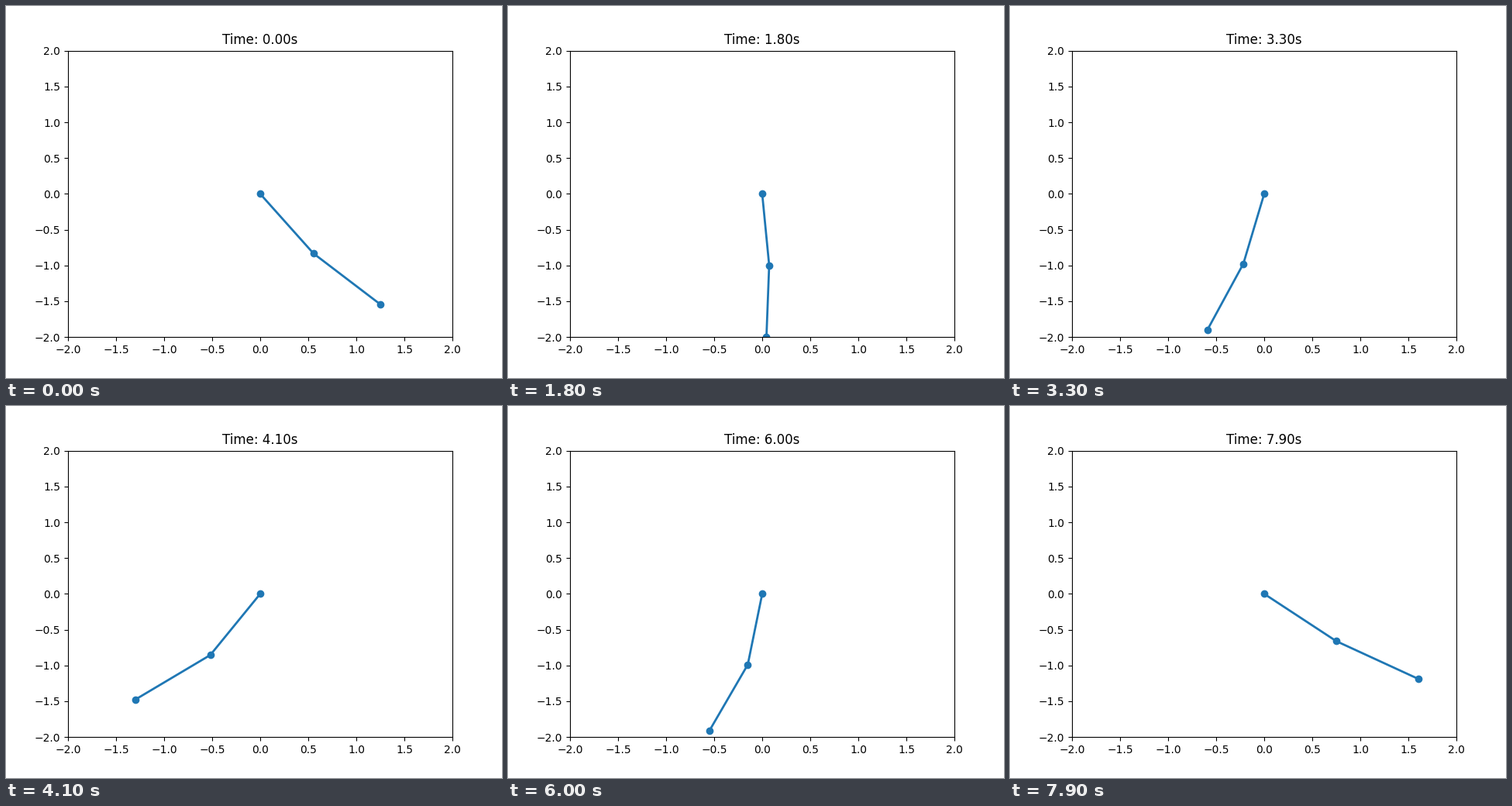
A matplotlib script that plays this animation: 640x480 px, repeating every 8000 ms.

```python
import numpy as np
import matplotlib.pyplot as plt
from matplotlib.animation import FuncAnimation

G = 9.81
DT = 0.1
FRAMES = 80
WARMUP = 2  # steps already taken when the clock reads zero


def accelerations(theta, omega):
    """Angular accelerations for unit masses and unit rods."""
    (t1, t2), (w1, w2) = theta, omega
    s, c = np.sin(t1 - t2), np.cos(t1 - t2)
    r1 = -s * w2**2 - 2 * G * np.sin(t1)
    r2 = s * w1**2 - G * np.sin(t2)
    return np.array([r1 - c * r2, 2 * r2 - c * r1]) / (2 - c**2)


def simulate(steps):
    """Semi-implicit Euler from rest; returns the angles after each step."""
    theta = np.array([np.pi / 4, np.pi / 4])
    omega = np.zeros(2)
    path = []
    for _ in range(steps):
        omega = omega + accelerations(theta, omega) * DT
        theta = theta + omega * DT
        path.append(theta)
    return np.array(path)


angles = simulate(FRAMES + WARMUP)[WARMUP - 1:]

fig, ax = plt.subplots(figsize=(6.4, 4.8), dpi=100)
ax.set_xlim(-2, 2)
ax.set_ylim(-2, 2)
rods, = ax.plot([], [], "o-", lw=2)
title = ax.set_title("")


def update(i):
    x = np.cumsum(np.sin(angles[i]))
    y = -np.cumsum(np.cos(angles[i]))
    rods.set_data([0, *x], [0, *y])
    title.set_text(f"Time: {i * DT:.2f}s")
    return rods, title


anim = FuncAnimation(fig, update, frames=FRAMES, interval=100,
                     repeat=True, repeat_delay=0, blit=False)
plt.show()
```
